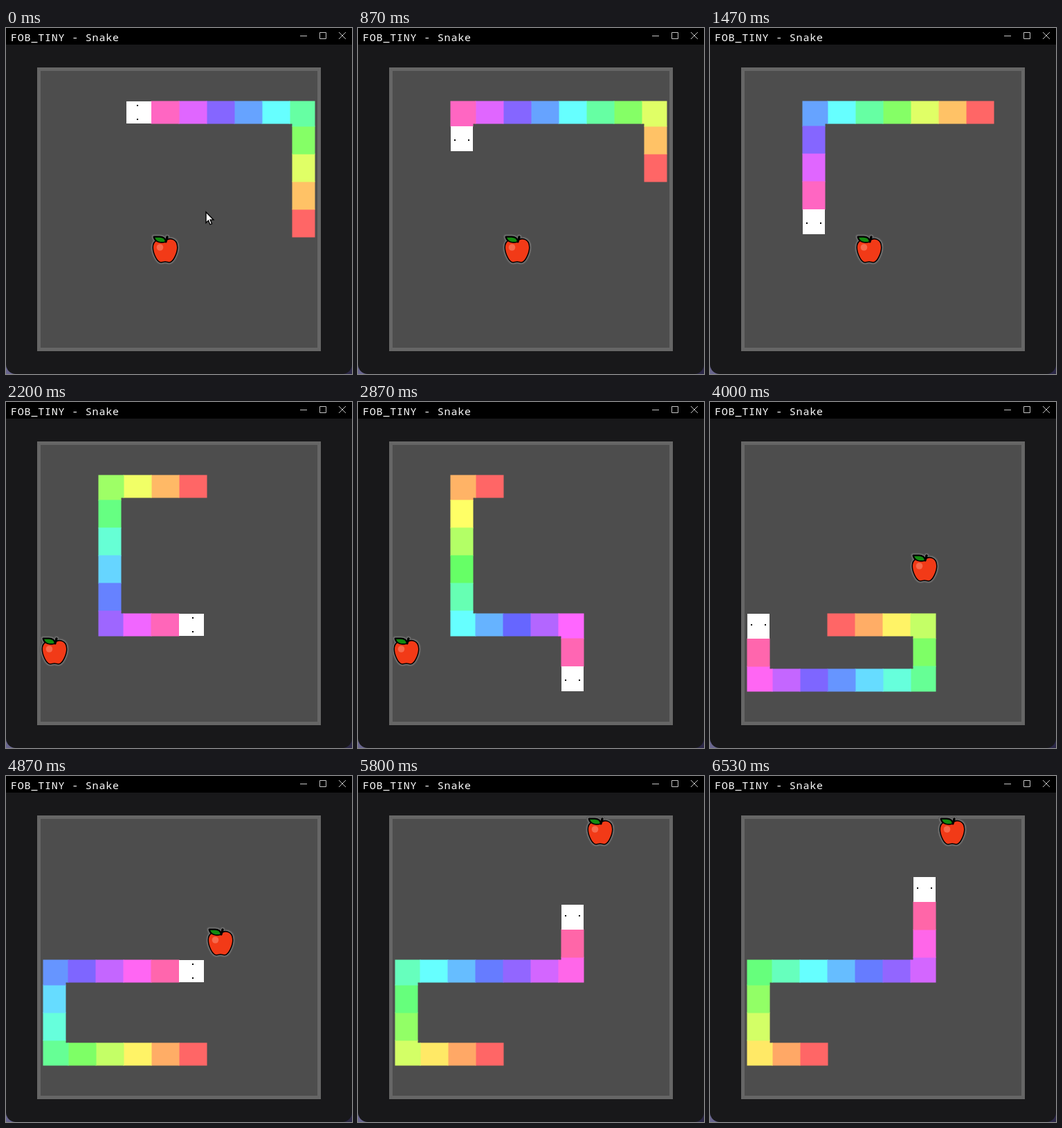
Animation of 500 by 500 pixels, one loop 7190 ms. Source, as an HTML page with a canvas:

```html
<!DOCTYPE html>
<html lang="en">
<head>
<meta charset="utf-8">
<title>Snake</title>
<style>
  html, body { margin: 0; width: 100%; height: 100%; overflow: hidden; background: #18181a; }
  canvas { position: absolute; left: 0; top: 0; display: block; }
  #title {
    position: absolute; left: 7px; top: 2px;
    font: 15px/22px "Noto Sans Mono", "DejaVu Sans Mono", monospace;
    letter-spacing: .8px; color: #fff; white-space: pre;
  }
</style>
</head>
<body>
<canvas id="stage" width="500" height="500"></canvas>
<div id="title">FOB_TINY - Snake</div>
<script>
const ctx = document.getElementById("stage").getContext("2d");
const LOOP = 7190, CELL = 40, HALF = 20;
const STEPS = { U: [0, -1], D: [0, 1], L: [-1, 0], R: [1, 0] };

// The whole route from the first tail cell to the last head cell.
const path = [[9, 5]];
for (const [, dir, count] of "U4 L7 D5 R4 D2 L6 U3 R6 U3".matchAll(/([UDLR])(\d)/g)) {
  for (let i = 0; i < +count; i++) {
    const [x, y] = path[path.length - 1];
    path.push([x + STEPS[dir][0], y + STEPS[dir][1]]);
  }
}

const START_HEAD = 10, START_LENGTH = 10;
const ticks = [870, 870, 1200, 1330, 1470, 1670, 1800, 2000, 2200, 2530, 2670, 2870,
  3000, 3130, 3330, 3470, 3600, 3800, 3930, 4000, 4130, 4330, 4470, 4600, 4730,
  4870, 5000, 5130, 5800, 6530];
// Each apple is eaten when the head reaches its place on the route.
const meals = [18, 19, 29, 38];
const apples = [...meals.map(i => path[i]), [7, 0]];
const pointerMoves = [[0, 289, 266], [70, 303, 272], [130, 328, 283], [200, 354, 294]];
const POINTER_END = 270;

const center = ([x, y]) => [70 + x * CELL, 82 + y * CELL];

function rect(color, x, y, w, h) {
  ctx.fillStyle = color;
  ctx.fillRect(x, y, w, h);
}

function drawWindow() {
  const desktop = ctx.createLinearGradient(0, 0, 500, 0);
  desktop.addColorStop(0, "#69668f");
  desktop.addColorStop(1, "#2b2747");
  rect(desktop, 0, 0, 500, 500);
  ctx.fillStyle = "#18181a";
  ctx.beginPath();
  ctx.roundRect(0, 0, 500, 500, [0, 0, 14, 14]);
  ctx.fill();
  rect("#000", 0, 0, 500, 24);
  rect("#666", 45, 57, 410, 410);
  rect("#4d4d4d", 50, 62, 400, 400);

  ctx.strokeStyle = "#c4c4c4";
  ctx.lineWidth = 1;
  ctx.beginPath();
  ctx.moveTo(425, 11.5); ctx.lineTo(435, 11.5);
  ctx.rect(453.5, 6.5, 9, 9);
  ctx.moveTo(481, 6); ctx.lineTo(491, 16);
  ctx.moveTo(491, 6); ctx.lineTo(481, 16);
  ctx.stroke();
}

const fruit = new Path2D("M0-11C5-17 17-16 17-3C17 5 11 18 6 18C3 18 2 17 0 17C-2 17-3 18-6 18C-11 18-17 5-17-3C-17-14-6-16 0-11Z");
const leaf = new Path2D("M-16-18H-8C-2-18 0-15 1-11C-6-9-14-10-16-18Z");
const stem = new Path2D("M1-11L3-18");

function drawApple(cell) {
  const [x, y] = center(cell);
  ctx.save();
  ctx.translate(x, y - 2);
  ctx.lineJoin = ctx.lineCap = "round";
  const outline = (color, width) => {
    ctx.strokeStyle = color;
    ctx.lineWidth = width;
    for (const shape of [fruit, leaf, stem]) ctx.stroke(shape);
  };
  outline("#5c5c5c", 8);
  outline("#747474", 5.5);
  outline("#000", 3);
  ctx.fillStyle = "#f23a17";
  ctx.fill(fruit);
  ctx.fillStyle = "#138a10";
  ctx.fill(leaf);
  ctx.lineWidth = 1.6;
  ctx.stroke(leaf);
  ctx.lineWidth = 3;
  ctx.stroke(stem);
  ctx.fillStyle = "#f7694c";
  ctx.beginPath();
  ctx.arc(-7.5, -3, 4.8, 0, 7);
  ctx.fill();
  ctx.restore();
}

// A cell's core reaches 16.5 px; arms extend it to the border of each joined cell.
function drawSegment(cell, arms, color) {
  const [x, y] = center(cell);
  const core = 16.5, reach = HALF + .5;
  ctx.fillStyle = color;
  ctx.beginPath();
  for (const [dx, dy] of arms) {
    const left = dx < 0 ? reach : core, right = dx > 0 ? reach : core;
    const up = dy < 0 ? reach : core, down = dy > 0 ? reach : core;
    ctx.rect(x - left, y - up, left + right, up + down);
  }
  ctx.fill();
}

function direction(from, to) {
  return [to[0] - from[0], to[1] - from[1]];
}

function drawHead(head) {
  const [x, y] = center(path[head]);
  const [dx, dy] = direction(path[head - 1], path[head]);
  ctx.save();
  ctx.transform(dx, dy, -dy, dx, x, y);
  rect("#fff", -HALF, -16, 36, 32);
  rect("#000", -1, -11, 2, 2);
  rect("#000", -1, 9, 2, 2);
  ctx.restore();
}

function drawSnake(head, length) {
  const tail = head - length;
  for (let i = tail; i < head; i++) {
    const ahead = direction(path[i], path[i + 1]);
    const behind = i > tail ? direction(path[i], path[i - 1]) : ahead.map(v => -v);
    drawSegment(path[i], [ahead, behind], `hsl(${(i - tail) * 360 / length}, 100%, 70%)`);
  }
  drawHead(head);
}

const arrow = new Path2D("M.5.5V16L4 12.6L6.4 18.4L9 17.3L6.6 11.6H11.3Z");

function drawPointer(time) {
  if (time >= POINTER_END) return;
  const [, x, y] = pointerMoves.findLast(move => move[0] <= time);
  ctx.save();
  ctx.translate(x - .5, y - .5);
  ctx.lineJoin = "miter";
  ctx.lineWidth = 1.4;
  ctx.strokeStyle = "#000";
  ctx.fillStyle = "#fff";
  ctx.fill(arrow);
  ctx.stroke(arrow);
  ctx.restore();
}

function draw(time) {
  const head = START_HEAD + ticks.filter(tick => tick <= time).length;
  const length = START_LENGTH + meals.filter(meal => meal < head).length;
  const eaten = meals.filter(meal => meal <= head).length;
  drawWindow();
  drawApple(apples[eaten]);
  drawSnake(head, length);
  drawPointer(time);
}

let start;
function frame(now) {
  start ??= now;
  draw((now - start) % LOOP);
  requestAnimationFrame(frame);
}
draw(0);
requestAnimationFrame(frame);
</script>
</body>
</html>
```
